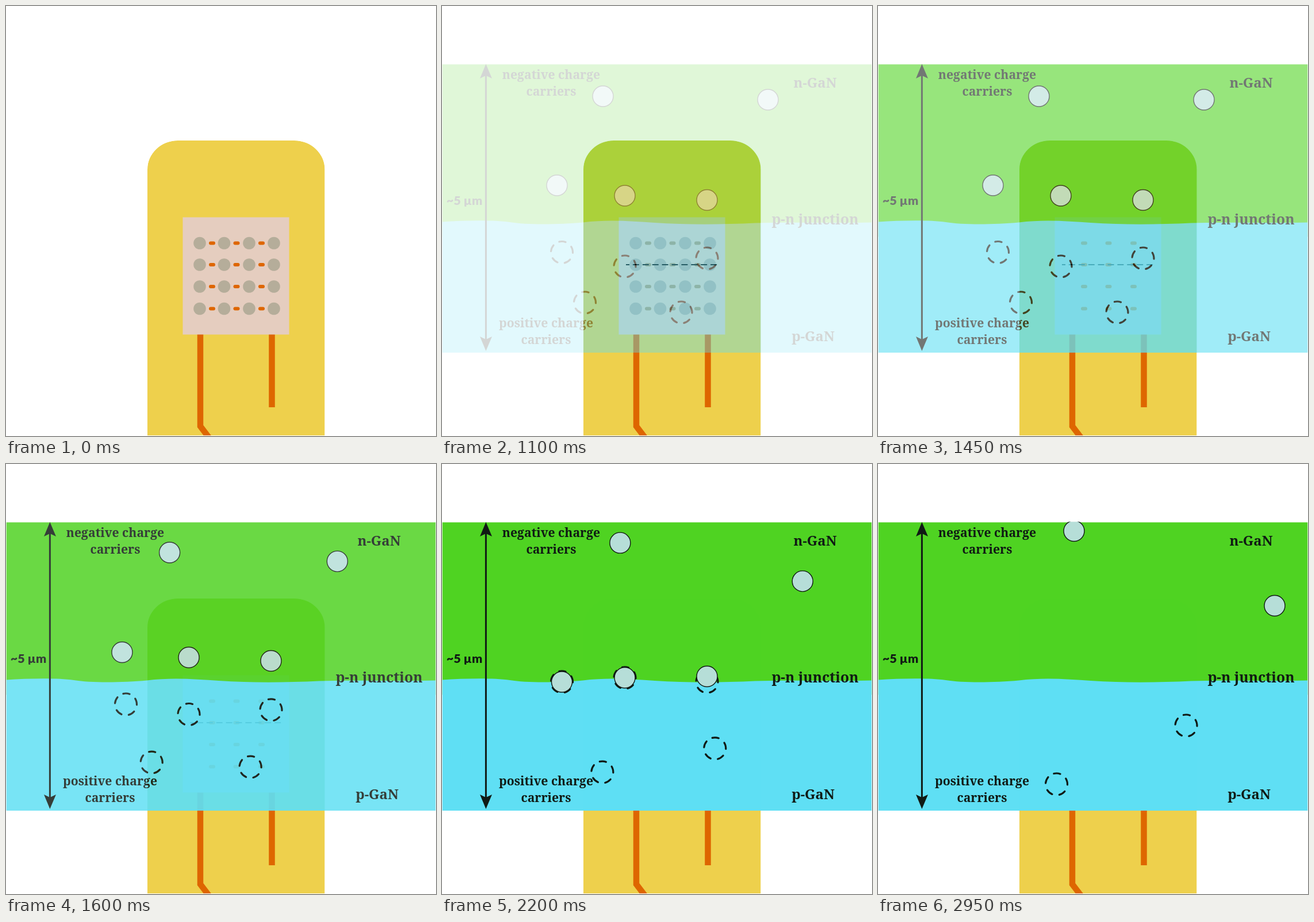
An HTML page with a canvas for the animation above (3950 ms loop, 748 by 748 pixels).

```html
<!DOCTYPE html>
<html lang="en">
<head>
<meta charset="utf-8">
<title>LED p-n junction</title>
<style>
  html, body { margin: 0; width: 100%; height: 100%; overflow: hidden; background: #fff; }
  canvas { display: block; width: 748px; height: 748px; }
</style>
</head>
<body>
<canvas id="stage" width="748" height="748"></canvas>
<script>
const SIZE = 748, LOOP = 3950, STEP = 50;
const INK = '#101a14', ORANGE = '#de6600';
const stage = document.getElementById('stage').getContext('2d');
const layerCanvas = document.createElement('canvas');
layerCanvas.width = layerCanvas.height = SIZE;
const layer = layerCanvas.getContext('2d');

const DRIFT_START = 1490, DRIFT_END = 2940;
// Each carrier: start point, end point, arrival time.
const pairedElectrons = [
  [200, 312, 208.5, 379, 1965],
  [318, 330, 318, 372, 2205],
  [461, 337.5, 461, 379, 2410],
];
const pairedHoles = [
  [208.5, 428.5, 208.5, 379, 2010],
  [318, 453, 318, 372, 2000],
  [461, 439, 461, 379, 2080],
];
const freeElectrons = [
  [280, 157, 341, 116.5, DRIFT_END],
  [567, 163, 690, 246.5, DRIFT_END],
];
const freeHoles = [
  [248.5, 516, 310.5, 557, DRIFT_END],
  [416, 533, 536, 455, DRIFT_END],
];

const progress = (t, start, end) => Math.min(1, Math.max(0, (t - start) / (end - start)));

function position([x0, y0, x1, y1, arrival], t) {
  const p = progress(t, DRIFT_START, arrival);
  return [x0 + (x1 - x0) * p, y0 + (y1 - y0) * p];
}

function bodyPath() {
  const c = stage;
  c.beginPath();
  c.moveTo(246, 747);
  c.lineTo(246, 284);
  c.ellipse(299, 284, 53, 50, 0, Math.PI, 1.5 * Math.PI);
  c.ellipse(501.5, 284, 53, 50, 0, 1.5 * Math.PI, 2 * Math.PI);
  c.lineTo(554.5, 747);
  c.closePath();
}

function drawLed(t) {
  const c = stage;
  bodyPath();
  c.fillStyle = '#eed04c';
  c.fill();

  c.strokeStyle = ORANGE;
  c.lineWidth = 10.5;
  c.stroke(new Path2D('M338 571V731L354 752M462.5 571V698'));

  c.fillStyle = '#e5cdbf';
  c.fillRect(307.5, 367.5, 185, 204);
  for (const y of [412.5, 450, 488, 526.5]) {
    if (t < 1200) {
      c.fillStyle = t < 650 ? '#b5ad9a' : '#b7aca3';
      for (const x of [337, 379.5, 423, 466]) {
        c.beginPath();
        c.arc(x, y, 10.8, 0, 2 * Math.PI);
        c.fill();
      }
    }
    c.fillStyle = t >= 650 && t < 1200 ? '#b09673' : ORANGE;
    for (const x of [358.5, 401, 444.5]) {
      c.beginPath();
      c.roundRect(x - 5.5, y - 3, 11, 6, 3);
      c.fill();
    }
  }

  if (t >= 100) {
    c.save();
    c.strokeStyle = '#000';
    c.lineWidth = 2;
    c.setLineDash([11, 5.9]);
    c.lineDashOffset = 5;
    c.beginPath();
    c.moveTo(320, 450);
    c.lineTo(320 + 160 * progress(t, 50, 1000), 450);
    c.stroke();
    c.restore();
  }
}

function drawElectron(carrier, t) {
  const c = layer;
  c.beginPath();
  c.arc(...position(carrier, t), 18, 0, 2 * Math.PI);
  c.fillStyle = '#b6ded8';
  c.fill();
  c.lineWidth = 1.4;
  c.strokeStyle = INK;
  c.stroke();
}

function drawHole(carrier, t) {
  const c = layer, r = 19, pitch = 2 * Math.PI * r / 5, dash = 11.3;
  const start = -87 * Math.PI / 180 - dash / 2 / r;
  c.save();
  c.setLineDash([dash, pitch - dash]);
  c.lineCap = 'round';
  c.lineWidth = 3.2;
  c.strokeStyle = INK;
  c.beginPath();
  c.arc(...position(carrier, t), r, start, start + 2 * Math.PI);
  c.stroke();
  c.restore();
}

function label(text, x, y, size, font = 'bold', family = '"Noto Serif", serif') {
  layer.font = `${font} ${size}px ${family}`;
  layer.fillText(text, x, y);
}

function drawAnnotations() {
  const c = layer;
  c.fillStyle = INK;
  c.fillRect(74.9, 115, 3, 472);
  c.fill(new Path2D('M76.4 101L87 126L76.4 121L66 126ZM76.4 600L87 575L76.4 580L66 575Z'));

  c.textAlign = 'center';
  label('negative charge', 190, 127, 21.2);
  label('carriers', 190, 156, 21.2);
  label('positive charge', 181, 559, 21.2);
  label('carriers', 181, 588, 21.2);
  label('n-GaN', 649, 142, 24);
  label('p-GaN', 645.5, 583, 24);
  label('p-n junction', 649, 380, 24.7);
  label('~5 µm', 39, 346, 21.5, '900', 'Lato, sans-serif');
}

function drawJunction(t) {
  const c = layer;
  c.clearRect(0, 0, SIZE, SIZE);
  c.save();
  c.beginPath();
  c.rect(0.5, 100.5, 747, 502.5);
  c.clip();

  c.fillStyle = '#4fd322';
  c.fillRect(0.5, 101.5, 747, 300);
  c.fillStyle = '#5fdff4';
  c.fill(new Path2D('M0.5 375.5C40 373 88 372 118 376C148 381 205 380 245 376.5' +
    'C290 371 330 374.5 370 377C430 381 490 380 545 377.5C600 375.5 680 378 747.5 376.5V603.5H0.5Z'));

  c.globalAlpha = 1 - progress(t, 2400, 2800);
  pairedHoles.forEach(h => drawHole(h, t));
  pairedElectrons.forEach(e => drawElectron(e, t));
  c.globalAlpha = 1;
  freeHoles.forEach(h => drawHole(h, t));
  freeElectrons.forEach(e => drawElectron(e, t));
  drawAnnotations();
  c.restore();
}

function render(t) {
  const c = stage;
  c.fillStyle = '#fff';
  c.fillRect(0, 0, SIZE, SIZE);
  c.save();
  bodyPath();
  c.clip();
  drawLed(t);
  c.restore();

  // The close-up has opacity fade² on the empty background. The second pass
  // over the LED raises it to fade there.
  const fade = progress(t, 690, 1680);
  drawJunction(t);
  c.save();
  c.globalAlpha = fade * fade;
  c.drawImage(layerCanvas, 0, 0);
  bodyPath();
  c.clip();
  c.globalAlpha = fade / (1 + fade);
  c.drawImage(layerCanvas, 0, 0);
  c.restore();
}

function tick() {
  const t = performance.now() % LOOP;
  render(Math.floor(t / STEP) * STEP);
  requestAnimationFrame(tick);
}
tick();
</script>
</body>
</html>
```
